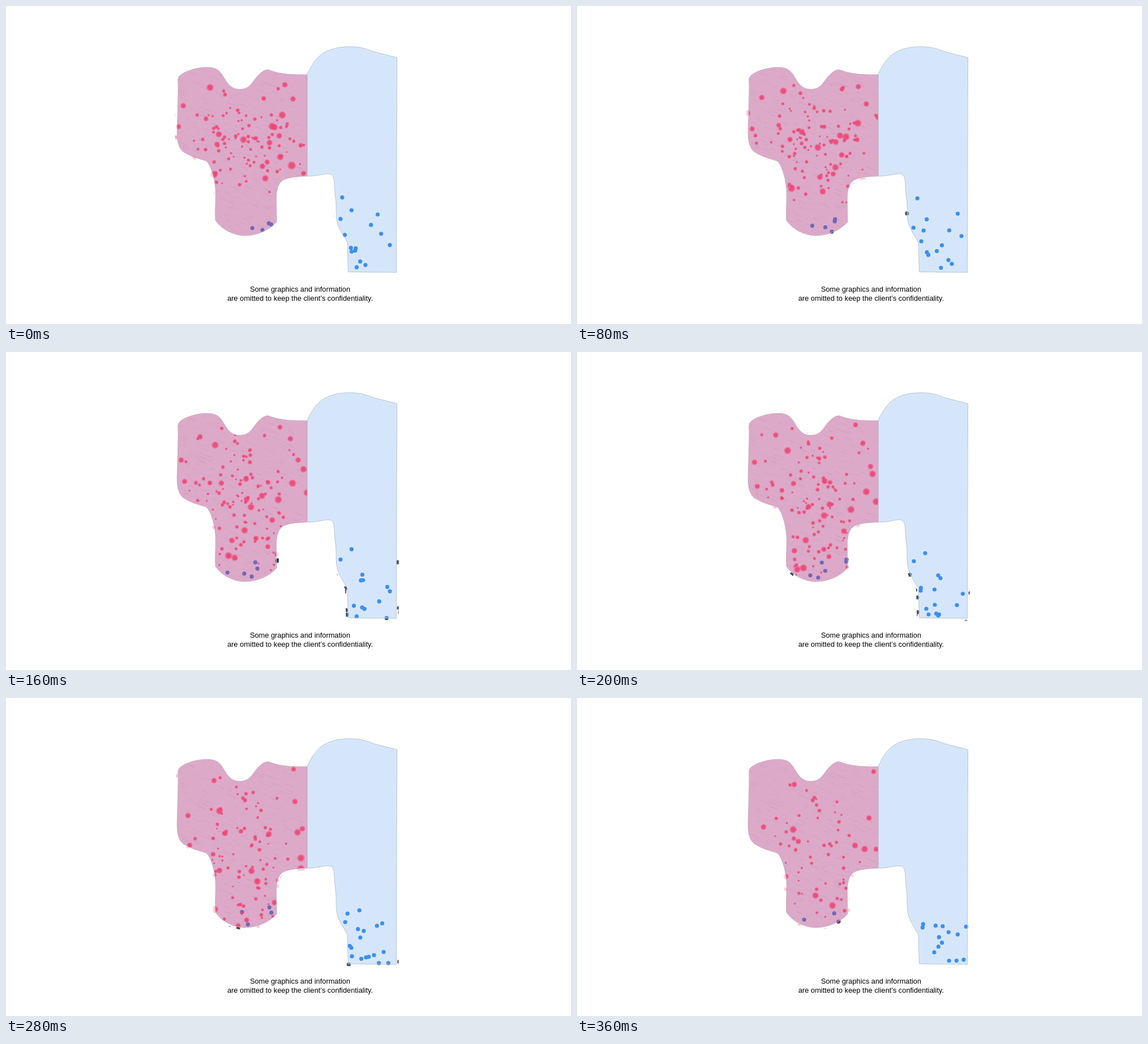
An HTML page with a canvas that plays this animation: 998x561 px, repeating every 0.4 s.

```html
<!DOCTYPE html>
<html lang="en">
<head>
<meta charset="utf-8">
<style>
  html, body { margin: 0; width: 100%; height: 100%; overflow: hidden; background: #fff; }
  canvas { display: block; }
</style>
</head>
<body>
<canvas id="stage" width="998" height="561"></canvas>
<script>
const ctx = document.getElementById('stage').getContext('2d');
const STEP = 40, STEPS = 10, GRAVITY = 0.92, MID = 5;

const tissue = new Path2D(`M304 135C303 125 306 122 318 116C335 109 350 107.5 360 108.5C376 110 379 117 386 128
  C393 140 400 147 413 147C430 147 434 136 443 125C452 115 459 111 465 113C480 119 500 122 532 121L532 300
  C510 301 495 303 488 308C477 316 477 335 477.5 350L478 381C465 395 445 405 420 405C400 404 380 393 370 378
  C369 360 371 340 370 322C368 300 361 280 354 273.5C345 270 330 268 313 257C298 245 303 215 303 195
  C303.5 170 304.5 150 304 135Z`);
const fluid = new Path2D(`M532 121C540 102 552 86 566 80C580 73 600 71 615 72C635 73 645 80 655 82L690.5 91
  L689.5 470L604.5 469L603 417C598 408 590 397 586 385C581 370 585 350 581.5 335C579 315 582 300 573 296.5
  C565 294 550 301 532 300Z`);

// Each row: position and velocity (px per step) at the middle of the loop
const blueDots = [
  [615, 355, 4.6, 8], [595, 369, 4.1, 3.8], [638, 394, 8.6, 2.1], [642, 399, 11.3, -2.6],
  [597.5, 420, 12.1, -8], [607.5, 416, 12.2, -4.4], [607, 421, 9.4, -1], [631.5, 419, 4.6, 17],
  [681.5, 426.5, 8, 13], [632, 446, 17.5, -.8], [671, 446.5, 11.8, 7.5], [617, 453, 16.5, -1.5],
  [634.5, 461.5, 5.5, 11.8], [639.5, 463, 6.3, 10.7], [638, 465, 18.7, -.5], [621, 463, 18.8, .5],
  [601.5, 459, 17.2, -2.6], [598, 464, 14.8, -3.8], [581.6, 450, 14.2, -6.5], [574.6, 460, 16.2, -13.2],
  [591, 470, 10, -9], [588, 393, 5.6, -.7], [702.5, 376, 10, 6], [601, 433, 2.2, 16.7],
  [710, 426, 10.3, 9.5], [695, 425, 16.8, 3.7], [713, 456, 19, 5.4], [713, 464, 17, 5.8],
  [687, 476, 14.7, 7.5], [747, 439, 15, 8], [432.5, 371.5, -7.8, 1.2], [412, 394, -8.9, 4],
  [438.5, 386, -5.6, 4.8], [426, 398, -8, 2.7], [476, 366, -5.4, -.2], [475.5, 370, -3.4, 2.5],
  [379, 392.5, -12.2, 4.4]
];
// The larger pink dots, with radius
const pinkDots = [
  [492, 128.5, 8, -3.3, 4.5], [505, 161, 2.7, 9, 5], [351, 146.5, 8.2, -2.2, 5], [372, 174, 2.5, 10.8, 6.3],
  [518.5, 202, 2.5, 12.5, 5], [522, 215, -3.5, 9.2, 6], [313.5, 194.5, 4, 4.6, 5], [318.5, 237, 3, 9.5, 4.8],
  [382.5, 232, 2.1, 1.6, 5], [362, 244, 1.9, 14, 4.5], [437.5, 227.5, 13.4, 4.5, 5.5], [447, 230, -16, .8, 4.3],
  [511, 246.5, 5, 16, 6.5], [484, 278, 3, 18.5, 6.5], [528.5, 264, -3.7, 16.7, 6.5], [409, 273, -16, 13.8, 5.3],
  [446, 269, -6.2, 16.2, 5.8], [436.5, 288.5, 3.7, 15.7, 6.2], [471.5, 316, 1.3, 20.5, 5.3], [404, 332, -17.5, 18.5, 6],
  [400, 381, 7, 22.5, 6.5], [389, 383.5, -15, 21.5, 5.8], [384, 350.5, -15, 19, 5.2], [436, 348, -5.5, 20, 4.8],
  [445, 361, -17.5, 18.5, 4.7], [507, 377, .5, 25, 7.3], [428, 188, -2.9, -5.6, 3.9], [409, 162, 4.8, 5.5, 3.6],
  [450, 152, -6.7, 5.5, 3.3]
];

let seed = 7;
const random = () => (seed = seed * 16807 % 2147483647) / 2147483647;
const spread = size => (random() - .5) * size;

for (let i = 0; i < 100; i++) {
  const y = 270 + spread(150) + spread(150);
  pinkDots.push([420 + spread(130) + spread(100), y, spread(30), (y - 160) * .085 + spread(10), 1.7 + random() * 1.9]);
}
const fibres = Array.from({ length: 330 }, () => [300 + random() * 230, 110 + random() * 295, 5 + random() * 9]);

const place = ([x, y, vx, vy, r = 3.6], d) => ({ x: x + vx * d, y: y + vy * d + GRAVITY * d * d, r });

function disc(x, y, r, color) {
  ctx.fillStyle = color;
  ctx.beginPath();
  ctx.arc(x, y, r, 0, 7);
  ctx.fill();
}

function inside(path, paint) {
  ctx.save();
  ctx.clip(path);
  paint();
  ctx.restore();
}

function area(path, fill, paint, line) {
  ctx.fillStyle = fill;
  ctx.fill(path);
  inside(path, paint);
  ctx.strokeStyle = line;
  ctx.lineWidth = 1;
  ctx.stroke(path);
}

// Remnants of dots that have just crossed the outline
function drawRemnants(blue, pink) {
  for (const p of pink) if (p.x < 535) disc(p.x, p.y, p.r, 'rgba(240,110,150,.35)');
  for (const p of blue) disc(p.x, p.y, p.r, 'rgba(30,35,50,.8)');
  ctx.globalCompositeOperation = 'destination-in';
  ctx.lineWidth = 8;
  const outline = new Path2D(tissue);
  outline.addPath(fluid);
  ctx.stroke(outline);
  ctx.globalCompositeOperation = 'source-over';
}

function drawFibres() {
  ctx.strokeStyle = 'rgba(160,140,180,.32)';
  ctx.lineWidth = .8;
  ctx.beginPath();
  for (const [x, y, w] of fibres) {
    ctx.moveTo(x, y);
    ctx.quadraticCurveTo(x + w / 2, y + w * .12, x + w, y + w * .4);
  }
  ctx.stroke();
}

function draw(step) {
  // The loop opens slightly after the first step has begun
  const d = (step || .4) - MID;
  const blue = blueDots.map(p => place(p, d));
  const pink = pinkDots.map(p => place(p, d));

  ctx.clearRect(0, 0, 998, 561);
  drawRemnants(blue, pink);
  area(fluid, '#d6e6fa', () => {
    for (const p of blue) disc(p.x, p.y, p.r, '#3a90f0');
  }, '#b5c6d0');
  area(tissue, '#dda9c8', () => {
    drawFibres();
    for (const p of blue) disc(p.x, p.y, p.r, '#7068b6');
    for (const p of pink) {
      disc(p.x, p.y, p.r, 'rgba(238,72,120,.5)');
      disc(p.x, p.y, p.r * .7, 'rgba(240,64,112,.75)');
    }
  }, '#c5aebd');

  ctx.fillStyle = '#000';
  ctx.font = '12.8px "Liberation Sans", Arial, sans-serif';
  ctx.textAlign = 'center';
  ctx.fillText('Some graphics and information', 519.5, 504);
  ctx.fillText('are omitted to keep the client’s confidentiality.', 519.5, 520);
}

function tick() {
  draw(Math.floor(performance.now() / STEP) % STEPS);
  requestAnimationFrame(tick);
}
tick();
</script>
</body>
</html>
```
